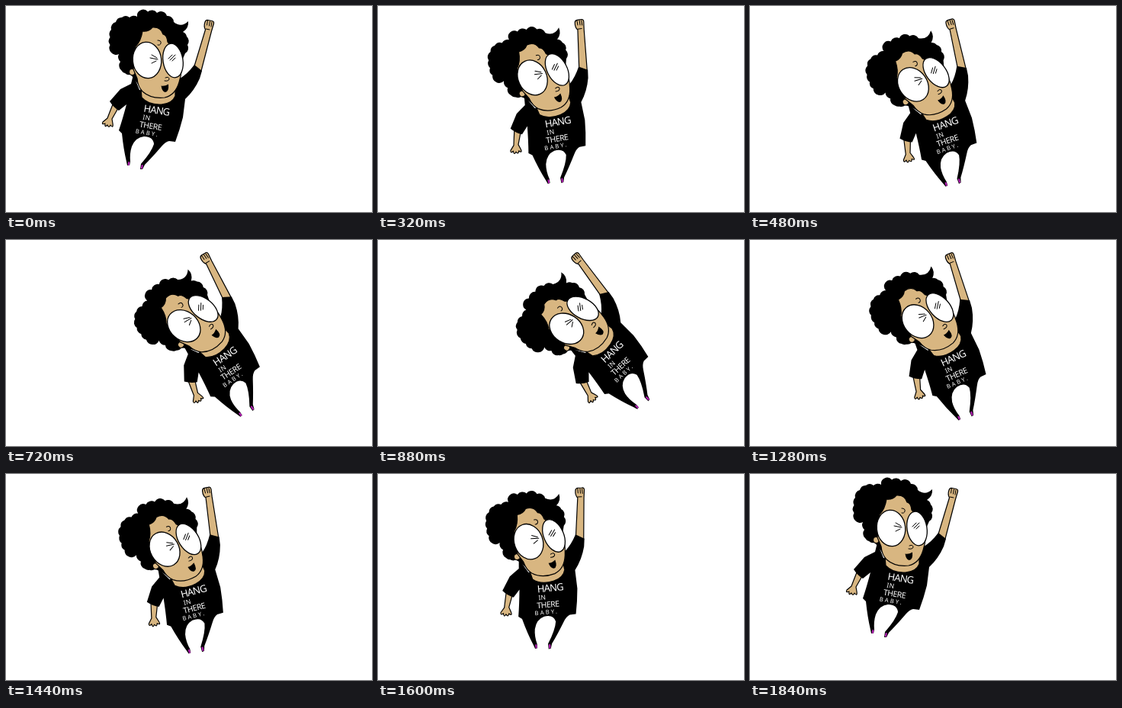
Write an HTML page that moves like this. It is 480x270 px and loops after 1.92 s.

```html
<!DOCTYPE html>
<html lang="en">
<head>
<meta charset="utf-8">
<title>Hang in there</title>
<style>
  html, body { margin: 0; width: 100%; height: 100%; overflow: hidden; background: #fff; }
  svg { display: block; width: 100vw; height: 100vh; }
  .skin { fill: #d8b681; stroke: #000; stroke-width: 1.2; stroke-linejoin: round; }
  .lens { fill: #fff; stroke: #000; stroke-width: 1.3; }
  .line { fill: none; stroke: #000; stroke-width: 1; stroke-linecap: round; }
  .shoe { stroke: #b51fb5; stroke-width: 2.2; stroke-linecap: round; }
  text { fill: #fff; font-family: "Noto Sans", "Open Sans", sans-serif; }
</style>
</head>
<body>
<svg viewBox="0 0 480 270">
  <g id="figure">
    <path id="hair"/>

    <!-- raised arm -->
    <path class="skin" d="M246 82 L261.500 31 Q259 27 261 21 Q262 18 265 18.500 L270 19.500 Q273 20 272.500 23 L269.500 33 L256 85Z"/>
    <path class="line" d="M264.500 19 L263.500 25 M267.500 20 L266.500 26 M270 21 L269 27 M262 30 L267 31"/>

    <!-- lowered arm -->
    <path class="skin" d="M140 129 Q136 139 133 147 L127 152 Q125 156 130 154 Q129 160 133 156 Q135 161 137 156 Q141 161 140 154 L139 148 L147 134Z"/>

    <!-- shirt and legs -->
    <path d="M167 90 L164 102 Q156 106 150 109 L136 125 Q141 133 148 137 L158 129 Q153 148 148 163
             L152 167 Q154 187 158 204 L159 209 L162 209 L163 204 Q162 193 165 184 Q170 172 181 171
             Q193 171 194 181 Q191 191 177 207 L176 214 L179 214 L182 208 Q192 198 204 184
             Q209 178 214 177 L222 178 Q228 162 232 146 L235 122 Q247 111 254 95 L257 85
             L247 77 Q238 89 228 95 L220 116 L175 110Z"/>
    <path class="shoe" d="M161.300 205 L160.800 208 M178.700 209 L178 212.500"/>

    <!-- head -->
    <path class="skin" d="M177 109 L178 120 Q187 130 204 129 Q218 128 222 118 L222 108Z"/>
    <circle class="skin" cx="165.500" cy="86.500" r="4"/>
    <path class="skin" d="M170 53 Q177 46 179 33 Q187 34 192 28 Q203 27 206 37 Q211 38 212 47 L230 68 Q232 84 227 100
                          Q222 117 208 120 Q190 122 179 112 Q173 106 172 95 L167 83Z"/>
    <ellipse class="lens" cx="219" cy="71.500" rx="13" ry="22.500" transform="rotate(-9 219 71.500)"/>
    <ellipse class="lens" cx="185" cy="71" rx="18.700" ry="23.700" transform="rotate(-6 185 71)"/>
    <path class="line" d="M191 64 L198 68 M189 68 L199 70 M191 75 L197 72
                          M213 69 L218 64 M215 71 L222 64 M218 72 L222 68
                          M199 45 Q204 45 203 49 Q202 52 199 51
                          M209 94 Q214 92 214 96 Q213 99 208 98"/>
    <path d="M203.500 104.500 Q208 105.500 213 102.500 Q214 113 208.500 113 Q204.500 112 203.500 104.500Z"/>

    <g id="slogan"></g>
  </g>
</svg>
<script>
  const FRAME_MS = 80, FRAMES = 24, STEP_DEG = 4.73;
  const PIVOT = "262.5 29.8";
  const figure = document.getElementById("figure");

  // Joins points with outward arcs for a curly edge.
  const curls = points => points.map(([x, y]) => `A8 8 0 0 1 ${x} ${y}`).join("");
  const crown = [[186, 7.5], [198, 9], [211, 13], [220, 21]];
  const rightSide = [[237, 40], [238, 51], [235, 62]];
  const leftSide = [[151, 84], [150, 73], [148, 63], [138, 61], [136.5, 51],
                    [136.5, 41], [138, 31], [144, 21], [152, 15], [162, 15], [172, 14]];
  document.getElementById("hair").setAttribute("d",
    `M172 14${curls(crown)}Q230 29 239 20Q240 29 232 34${curls(rightSide)}` +
    `L222 92L175 106Q168 94 163 90${curls([[156, 88]])}${curls(leftSide)}Z`);

  const slogan = [
    ["HANG", 180, 138.5, 13, -0.8], ["IN", 179, 148.5, 8.5, 0.3],
    ["THERE", 174.5, 158.5, 10.5, -0.5], ["BABY.", 169.5, 166.5, 7.6, 2.2]
  ];
  document.getElementById("slogan").innerHTML = slogan.map(([word, x, y, size, gap]) =>
    `<text transform="translate(${x} ${y}) rotate(9)" font-size="${size}" letter-spacing="${gap}">${word}</text>`
  ).join("");

  // The figure swings stepwise around its fist, resting two frames at each end.
  function draw(ms) {
    const frame = Math.floor(ms / FRAME_MS) % FRAMES;
    const swing = Math.min(frame, FRAMES - 1 - frame);
    figure.setAttribute("transform", `rotate(${-swing * STEP_DEG} ${PIVOT})`);
  }

  const start = performance.now();
  function tick() {
    draw(performance.now() - start);
    requestAnimationFrame(tick);
  }
  tick();
</script>
</body>
</html>
```
